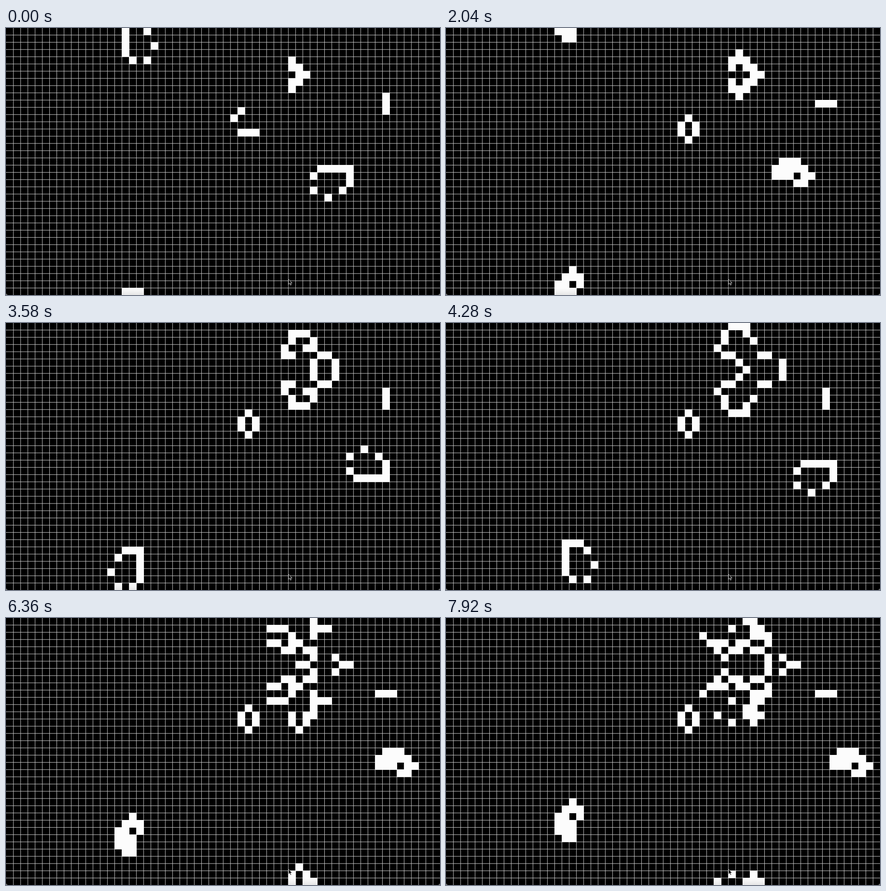
An HTML page with a canvas that plays this animation: 953 by 587 pixels, repeating every 8000 ms.

```html
<!DOCTYPE html>
<html lang="en">
<head>
<meta charset="utf-8">
<title>Game of Life</title>
<style>
  html, body { margin: 0; width: 100%; height: 100%; overflow: hidden; background: #000; }
  canvas { display: block; width: 100vw; height: 100vh; }
</style>
</head>
<body>
<canvas id="stage" width="953" height="587"></canvas>
<script>
const W = 953, H = 587, COLS = 60, ROWS = 37;
const PITCH = 15.89, TOP = -0.4, LOOP = 8000;

// When each new generation appears, in ms.
const STEPS = [60, 480, 880, 1320, 1720, 2140, 2440, 2740, 3160, 3560, 3960,
  4280, 4680, 5120, 5520, 5960, 6360, 6760, 7200, 7600, 7920];

// Starting patterns: [column, row, picture]
const SEEDS = [
  [16, 36, ['###', '#..#', '#', '#...#', '#', '.#.#']],
  [42, 19, ['.#####', '#....#', '.....#', '#...#', '..#']],
  [39, 4, ['#', '##', '.##', '##', '#']],
  [31, 11, ['.#', '#', '', '.###']],
  [52, 9, ['#', '#', '#']]
];

const index = (x, y) => (y + ROWS) % ROWS * COLS + (x + COLS) % COLS;

function seedGrid() {
  const grid = new Uint8Array(COLS * ROWS);
  for (const [x, y, picture] of SEEDS)
    picture.forEach((line, j) => [...line].forEach((c, i) => {
      if (c === '#') grid[index(x + i, y + j)] = 1;
    }));
  return grid;
}

function evolve(grid) {
  return grid.map((alive, k) => {
    const x = k % COLS, y = Math.floor(k / COLS);
    let around = -alive;
    for (let j = -1; j <= 1; j++)
      for (let i = -1; i <= 1; i++) around += grid[index(x + i, y + j)];
    return around === 3 || (alive && around === 2) ? 1 : 0;
  });
}

const generations = [seedGrid()];
STEPS.forEach((_, n) => generations.push(evolve(generations[n])));

const ctx = document.getElementById('stage').getContext('2d');
const cursor = new Path2D('M620.3 552.3V563.6L622.9 561.2L624.7 565.3L626.5 564.5L624.8 560.5H628.2Z');
const corners = new Path2D('M0 582A5 5 0 0 0 5 587H0ZM953 582A5 5 0 0 1 948 587H953Z');
const bottomShade = ctx.createLinearGradient(0, 572, 0, H);
bottomShade.addColorStop(0, '#fcfcfc');
bottomShade.addColorStop(1, '#e6e6e6');

function drawGrid() {
  ctx.fillStyle = '#000';
  ctx.fillRect(0, 0, W, H);
  ctx.beginPath();
  for (let i = 1; i < COLS; i++) {
    ctx.moveTo(i * PITCH + 0.3, 0);
    ctx.lineTo(i * PITCH + 0.3, H);
  }
  for (let j = 1; j < ROWS; j++) {
    ctx.moveTo(0, j * PITCH + TOP);
    ctx.lineTo(W, j * PITCH + TOP);
  }
  ctx.lineWidth = 1;
  ctx.strokeStyle = '#d0d0d0';
  ctx.stroke();
}

function drawCells(grid) {
  grid.forEach((alive, k) => {
    if (!alive) return;
    const x = k % COLS, y = Math.floor(k / COLS);
    ctx.fillStyle = y === ROWS - 1 ? bottomShade : '#fcfcfc';
    ctx.fillRect(x * PITCH, y * PITCH + TOP - 0.4, PITCH + 0.8, PITCH + 0.8);
  });
}

function drawOverlay() {
  ctx.fillStyle = '#888';
  ctx.fill(corners);
  ctx.fillStyle = '#000';
  ctx.fill(cursor);
  ctx.strokeStyle = '#eee';
  ctx.lineWidth = 0.9;
  ctx.stroke(cursor);
}

const start = performance.now();
let shown = -1;

function tick() {
  const time = (performance.now() - start) % LOOP;
  const n = STEPS.filter(t => t <= time).length;
  if (n !== shown) {
    shown = n;
    drawGrid();
    drawCells(generations[n]);
    drawOverlay();
  }
  requestAnimationFrame(tick);
}
tick();
</script>
</body>
</html>
```
